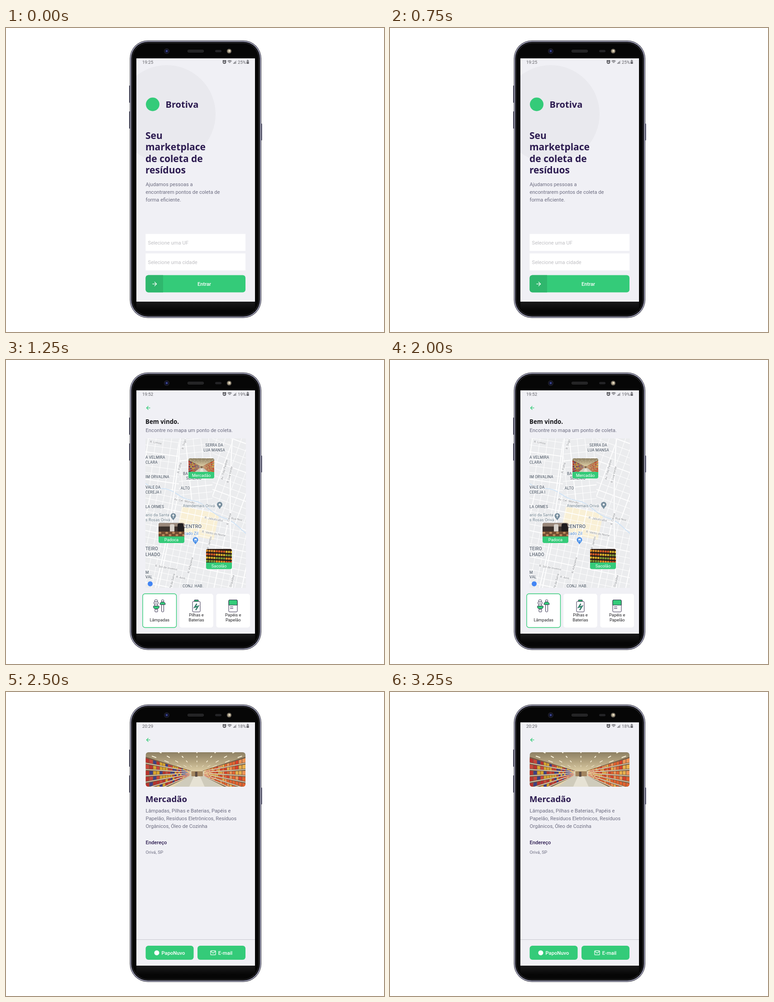
An HTML page with a canvas that plays this animation: 835x671 px, repeating every 3750 ms.

```html
<!DOCTYPE html>
<html lang="pt-BR">
<head>
<meta charset="utf-8">
<title>App de coleta</title>
<style>
html, body { margin: 0; width: 100%; height: 100%; overflow: hidden; background: #fff; }
canvas { display: block; width: 835px; height: 671px; }
</style>
</head>
<body>
<canvas id="stage"></canvas>
<script>
const W = 835, H = 671, HOLD = 1250;
const GREEN = '#34cb79', INK = '#2c1b50', GRAY = '#6c6c80', PAGE = '#f0f0f5';
const canvas = document.getElementById('stage');
const ctx = canvas.getContext('2d');
const dpr = window.devicePixelRatio || 1;
canvas.width = W * dpr;
canvas.height = H * dpr;

function box(x, y, w, h, fill, r = 0) {
  ctx.beginPath();
  ctx.roundRect(x, y, w, h, r);
  ctx.fillStyle = fill;
  ctx.fill();
}

function outline(color, width = 1) {
  ctx.strokeStyle = color;
  ctx.lineWidth = width;
  ctx.stroke();
}

function disc(x, y, r, fill) {
  ctx.beginPath();
  ctx.arc(x, y, r, 0, Math.PI * 2);
  ctx.fillStyle = fill;
  ctx.fill();
}

function trace(points) {
  ctx.beginPath();
  for (let i = 0; i < points.length; i += 2) ctx.lineTo(points[i], points[i + 1]);
}

function poly(points, fill) {
  trace(points);
  ctx.fillStyle = fill;
  ctx.fill();
}

function line(points, color, width = 1) {
  trace(points);
  outline(color, width);
}

function inBox(x, y, w, h, r, draw) {
  ctx.save();
  ctx.beginPath();
  ctx.roundRect(x, y, w, h, r);
  ctx.clip();
  draw();
  ctx.restore();
}

function fade(y0, y1, ...colors) {
  const g = ctx.createLinearGradient(0, y0, 0, y1);
  colors.forEach((c, i) => g.addColorStop(i / (colors.length - 1), c));
  return g;
}

function seeded(seed) {
  return () => (seed = seed * 16807 % 2147483647) / 2147483647;
}

function text(s, x, y, size, color, weight = 400, align = 'left', family = 'Roboto') {
  ctx.font = `${weight} ${size}px "${family}", sans-serif`;
  ctx.textAlign = align;
  ctx.fillStyle = color;
  ctx.fillText(s, x, y);
}

function heading(s, x, y, size, color = INK) {
  text(s, x, y, size, color, 700, 'left', 'Noto Sans');
}

function paragraph(lines, y) {
  lines.forEach((s, i) => text(s, 308.5, y + i * 17, 11.2, GRAY));
}

// Map label with a pale halo, centred vertically on y.
function label(s, x, y, size, color, { weight = 400, align = 'center', tilt = 0 } = {}) {
  ctx.save();
  ctx.translate(x, y);
  ctx.rotate(tilt * Math.PI / 180);
  ctx.font = `${weight} ${size}px Roboto, sans-serif`;
  ctx.textAlign = align;
  ctx.strokeStyle = 'rgba(255,255,255,.7)';
  ctx.lineWidth = 2;
  ctx.strokeText(s, 0, size * .36);
  ctx.fillStyle = color;
  ctx.fillText(s, 0, size * .36);
  ctx.restore();
}

function arrow(x, y, half, dir, color) {
  const tip = x + half * dir;
  line([x - half, y, x + half, y], color, 1.3);
  line([x, y - half, tip, y, x, y + half], color, 1.3);
}

function phone() {
  for (const y of [127, 184]) box(272, y, 4, 38, '#44445c', 1);
  box(562, 211, 4, 37, '#77778e', 1);
  ['#24242f', '#c3c3d8', '#8d8da6', '#18181d', '#0a0a0c', '#343436', '#060606'].forEach((color, d) =>
    box(273.5 + d, 27.5 + d, 290.5 - 2 * d, 612.5 - 2 * d, color, 40 - d));
  box(288, 604, 262, 20, fade(604, 624, '#1b1b1c', '#060606'));

  disc(355, 51, 6, '#25252c');
  disc(355, 51, 4.6, '#0c0e24');
  disc(355, 51, 2.4, '#39438c');
  box(401, 48, 36, 6, '#303032', 3);
  for (let x = 403; x < 436; x += 2) line([x, 49, x, 53], '#111', .8);
  box(462, 48.5, 14, 5, '#242427', 2.5);
  disc(493, 51, 5.5, '#4a4641');
  disc(493, 51, 4, '#a39780');
  disc(493.5, 50.5, 2, '#eee5cb');
}

function statusBar(time, charge) {
  const c = '#606066';
  text(time, 301, 78.5, 9.7, c);
  ctx.beginPath();
  ctx.arc(482.5, 75.3, 3, 0, Math.PI * 2);
  outline('#333338', 1.4);
  line([482.5, 73.5, 482.5, 75.5, 484, 76], '#333338', .9);
  for (const side of [-1, 1])
    line([482.5 + side * 2, 71.2, 482.5 + side * 3.8, 72.7], '#333338', 1.2);
  for (let r = 2; r < 7; r += 2.2) {
    ctx.beginPath();
    ctx.arc(494, 78, r, Math.PI * 1.25, Math.PI * 1.75);
    outline(c, 1.1);
  }
  for (let i = 0; i < 4; i++) box(502 + i * 1.9, 77.3 - i * 1.8, 1.2, 1.7 + i * 1.8, i < 3 ? c : '#a5a5aa');
  text(charge, 512, 78.5, 9.7, c);
  box(532.7, 70.5, 2.6, 1.5, c);
  box(531.5, 71.7, 5, 7.3, '#929298', .8);
  box(531.5, 75.5, 5, 3.5, c, .8);
}

function welcome() {
  disc(355, 190, 108, '#e9e9ee');
  statusBar('19:25', '25%');
  disc(324, 168.5, 15, GREEN);
  heading('Brotiva', 352.5, 176.2, 20);
  ['Seu', 'marketplace', 'de coleta de', 'resíduos']
    .forEach((s, i) => heading(s, 308, 244.8 + i * 25.4, 21));
  paragraph(['Ajudamos pessoas a', 'encontrarem pontos de coleta de', 'forma eficiente.'], 349.3);
  ['Selecione uma UF', 'Selecione uma cidade'].forEach((s, i) => {
    box(308.5, 454.5 + i * 43, 220.5, 37.5, '#fff');
    text(s, 313.5, 477.5 + i * 43, 11.2, '#c0c0c4');
  });
  inBox(308.5, 545.5, 220.5, 38, 6, () => {
    box(308, 545, 222, 39, GREEN);
    box(308, 545, 39, 39, '#2fb76d');
  });
  arrow(328, 565, 4.6, 1, '#fff');
  text('Entrar', 438, 569, 11.2, '#fff', 500, 'center');
}

// Supermarket aisle in a 220 x 76 field; everything runs to one vanishing point.
function aisle(x, y, w, h, r) {
  const vx = 113, vy = 45;
  const random = seeded(7);
  const toward = (px, py, t) => [px + (vx - px) * t, py + (vy - py) * t];
  const goods = [['#b8322d', '#3f3f83', '#d9a52e', '#c9463a'], ['#e2622f', '#d8402b', '#ee9356', '#e9b04c']];

  inBox(x, y, w, h, r, () => {
    ctx.translate(x, y);
    ctx.scale(w / 220, h / 76);
    box(0, 0, 220, 76, fade(0, 45, '#8d8063', '#b7a783', '#e2d3ab'));
    for (let lane = -4; lane <= 4; lane++)
      for (let t = .08; t < .85; t += .2) {
        const px = vx + lane * 46;
        line([...toward(px, -6, t), ...toward(px, -6, t + .07)], '#fff8e2', 2.6 * (1 - t));
      }
    poly([vx - 8, vy, vx + 8, vy, 168, 76, 62, 76], '#cfcbbb');
    poly([vx - 3, vy, vx + 3, vy, 130, 76, 96, 76], '#e6e2d4');

    [0, 220].forEach((edge, side) => {
      poly([edge, 10, ...toward(edge, 10, .88), ...toward(edge, 100, .88), edge, 100], '#735b45');
      for (let row = 0; row < 6; row++) {
        const top = 13 + row * 14;
        for (let t = 0; t < .85; t += .07 * (1.1 - t)) {
          const end = t + .06 * (1.1 - t);
          const color = goods[side][Math.floor(random() * 4)];
          poly([...toward(edge, top, t), ...toward(edge, top, end),
            ...toward(edge, top + 9, end), ...toward(edge, top + 9, t)], color);
        }
        line([edge, top + 11, ...toward(edge, top + 11, .88)], '#eadfc4', 1.6);
      }
    });
    box(101, 42, 25, 11, '#a3855f');
    box(109, 43, 5, 11, '#5a4a42');
  });
}

function bakery(x, y) {
  box(x, y, 57, 32, '#3b302c');
  box(x, y, 57, 8, '#99877a');
  box(x + 25, y + 3, 10, 18, '#d8d2cc', 3);
  box(x + 42, y + 1, 13, 21, '#201d1f', 4);
  box(x, y + 19, 57, 13, '#744c31');
  for (let i = 0; i < 8; i++) box(x + i * 7.5, y + 20 + i % 2 * 5, 6, 4, '#c49060', 2);
}

function produce(x, y) {
  box(x, y, 57, 32, '#33221a');
  const colors = ['#e29127', '#d65a25', '#dfb62c', '#7f9c35'];
  for (let row = 0; row < 4; row++)
    for (let i = 0; i < 11; i++)
      disc(x + 2 + i * 5.4, y + 4 + row * 7.5 + i * .3, 2.4, colors[(row + (i >> 2)) % 4]);
}

function pinCard(x, y, name, picture) {
  inBox(x, y, 57, 44.5, 4, () => {
    picture(x, y);
    box(x, y + 30, 57, 15, GREEN);
  });
  text(name, x + 28.5, y + 40.6, 9.3, '#fff', 400, 'center');
}

// Street grid filling the current clip.
function streets(angle, stepX, stepY) {
  ctx.save();
  ctx.translate(420, 400);
  ctx.rotate(angle * Math.PI / 180);
  for (let i = -30; i <= 30; i++) {
    const width = i % 4 ? 1 : 1.9;
    line([i * stepX, -400, i * stepX, 400], '#fff', width);
    line([-400, i * stepY, 400, i * stepY], '#fff', width);
  }
  ctx.restore();
}

function riverPath() {
  const points = [];
  for (let t = 0; t <= 1.01; t += .04)
    points.push(308 + 222 * t, 273 + 107 * t - 13 * Math.sin(Math.PI * t) + 3 * Math.sin(20 * t));
  return points;
}

function marker(x, y, color) {
  poly([x - 5.3, y + 2, x, y + 10, x + 5.3, y + 2], color);
  disc(x, y, 6, color);
}

function map() {
  const land = '#ebecee';
  const river = riverPath();
  box(308, 173, 222, 330, land);
  [8, -6, 20].forEach((angle, i) =>
    inBox(308 + i * 74, 173, 74, 220, 0, () => streets(angle, 17, 15)));
  ctx.save();
  trace([...river, 530, 503, 308, 503]);
  ctx.clip();
  box(308, 173, 222, 330, land);
  ctx.save();
  ctx.translate(424, 364);
  ctx.rotate(.21);
  box(-43, -33, 84, 58, '#f9f0d6');
  ctx.restore();
  streets(12, 15, 14);
  ctx.restore();
  line(river, '#cfe3f6', 1.8);
  for (const [x, lean] of [[385, -55], [500, 0]])
    for (const [color, width] of [['#dddfe3', 3.4], ['#fff', 2.6]]) {
      ctx.beginPath();
      ctx.moveTo(x, 173);
      ctx.quadraticCurveTo(x - 10, 320, x + lean, 503);
      outline(color, width);
    }

  const names = {
    10: [['R. Limos', 331, 182], ['Av. Cel. Morvão', 394, 311], ['R. Jabuticaba', 459, 351],
      ['R. Vento do Norte', 459, 383], ['Rua Noz', 510, 351], ['R. Sol de Inverno', 354, 458], ['R. Anis', 386, 480]],
    [-76]: [['R. Trigo', 393, 186], ['R. Folha', 383, 238], ['Av. Três Pedras', 482, 242], ['R. Lua Verde', 494, 253],
      ['R. Cereja', 492, 351], ['R. Jambo', 449, 403], ['R. Alfazema', 407, 453], ['Pé de Serra', 367, 488], ['Orquídea', 499, 488]]
  };
  for (const tilt in names)
    for (const [s, x, y] of names[tilt]) label(s, x, y, 6.7, '#888b90', { tilt: +tilt });

  const area = '#5d6774', place = '#6b7d8a';
  const bold = { weight: 500 }, edge = { weight: 500, align: 'left' }, start = { align: 'left' };
  label('SERRA DA', 460, 188, 8.5, area, bold);
  label('LUA MANSA', 460, 199, 8.5, area, bold);
  label('BA', 391, 251, 8.5, area, edge);
  label('SERÊNIO', 415, 261, 8.5, area, bold);
  label('ALTO', 396, 283, 8.5, area, bold);
  label('CENTRO', 411, 367.5, 11, area, bold);
  label('CONJ. HAB.', 413, 499, 8.5, area, bold);
  const districts = { 215: 'A VELMIRA', 226: 'CLARA', 258: 'IM ORVALINA', 281: 'VALE DA', 292: 'CEREJA I', 324: 'LA ORMES', 469: 'M', 479: 'VAL' };
  for (const y in districts) label(districts[y], 308, +y, 8.5, area, edge);
  ['TEIRO', 'LHADO'].forEach((s, i) => label(s, 308, 416 + i * 13, 10, area, edge));
  ['ario da Santa', 's Rosas Orivá'].forEach((s, i) => label(s, 308, 342 + i * 10.5, 9, place, start));
  label('Atendemais Orivá', 426, 322, 9, place);
  label('cado Zil', 393, 383, 9, '#4b86cf', start);

  marker(472, 319, '#778e9e');
  disc(472, 319, 2.2, '#fff');
  marker(369.5, 344, '#778e9e');
  line([369.5, 340, 369.5, 348], '#fff', 1.3);
  line([367, 343, 372, 343], '#fff', 1.3);
  marker(418.5, 397, '#4a90e8');
  box(416, 394.5, 5.5, 3, '#fff');
  disc(417.2, 399.5, .9, '#fff');
  disc(420.6, 399.5, .9, '#fff');
  disc(318.5, 494, 5.5, '#4285f4');
}

function part(x, y, w, h, fill, r = 1) {
  box(x, y, w, h, fill, r);
  outline('#322b4a');
}

function tile(x, lines, active) {
  box(x, 516, 74.5, 74.5, '#fff', 5);
  if (active) outline(GREEN, 1.4);
  const first = lines.length > 1 ? 566 : 577;
  lines.forEach((s, i) => text(s, x + 37.3, first + i * 11, 9.3, '#222226', 400, 'center'));
}

function itemIcons() {
  for (let i = 0; i < 3; i++) part(328 - i % 2 * 1.5, 529.5 + i * 4.5, 7 + i % 2 * 3, 4.5, '#fff', 2);
  part(325.5, 543, 13, 6.5, GREEN, [1, 1, 5, 5]);
  part(329, 550, 6, 6, '#fff');
  part(343.5, 529.5, 5, 4.5, '#fff');
  part(340, 534, 12, 6, GREEN, [5, 5, 1, 1]);
  part(343.5, 540, 5, 16, '#fff', 2);

  part(416, 529.5, 9, 3.5, GREEN);
  part(412, 533, 17, 23, '#fff', 2);
  const bolt = [421.5, 538, 416.5, 546, 424.5, 543.5, 419, 552];
  line(bolt, INK, 2.4);
  line(bolt, GREEN, 1.3);

  part(492, 529.5, 19, 26.5, '#fff', 2);
  part(492, 529.5, 19, 11.5, GREEN, [2, 2, 0, 0]);
  for (const y of [545, 548.5]) line([495, y, 502, y], INK);
}

function points() {
  statusBar('19:52', '19%');
  arrow(314.5, 105.7, 4, -1, GREEN);
  heading('Bem vindo.', 308, 141.3, 13.3, '#141418');
  paragraph(['Encontre no mapa um ponto de coleta.'], 159.3);
  inBox(308, 173, 222, 330, 2, map);
  pinCard(403, 217, 'Mercadão', (x, y) => aisle(x, y, 57, 31, 0));
  pinCard(337, 359.5, 'Padoca', bakery);
  pinCard(442, 417, 'Sacolão', produce);
  [['Lâmpadas'], ['Pilhas e', 'Baterias'], ['Papéis e', 'Papelão']]
    .forEach((lines, i) => tile(302 + i * 81.2, lines, i === 0));
  itemIcons();
}

function detail() {
  statusBar('20:29', '18%');
  arrow(314.5, 105.7, 4, -1, GREEN);
  aisle(308.5, 133, 220.5, 76, 6);
  heading('Mercadão', 308, 242.8, 18.6);
  paragraph(['Lâmpadas, Pilhas e Baterias, Papéis e', 'Papelão, Resíduos Eletrônicos, Resíduos', 'Orgânicos, Óleo de Cozinha'], 265.5);
  text('Endereço', 308.5, 335.8, 11.2, INK, 500);
  text('Orivá, SP', 308.5, 356.5, 9.8, GRAY);
  line([288, 546.5, 550, 546.5], '#c8c8cf');
  for (const x of [308.5, 423]) box(x, 560, 106, 31, GREEN, 6);
  disc(333, 575.7, 5.5, '#fff');
  text('PapoNuvo', 343.5, 580, 11.2, '#fff', 500);
  ctx.beginPath();
  ctx.roundRect(452, 571.2, 11, 9, 1);
  outline('#fff', 1.2);
  line([452, 572.3, 457.5, 576.3, 463, 572.3], '#fff', 1.2);
  text('E-mail', 468.7, 580, 11.2, '#fff', 500);
}

const screens = [welcome, points, detail];

function render(now) {
  ctx.setTransform(dpr, 0, 0, dpr, 0, 0);
  box(0, 0, W, H, '#fff');
  phone();
  inBox(288, 67, 262, 537, 0, () => {
    box(288, 67, 262, 537, PAGE);
    screens[Math.floor(now / HOLD) % screens.length]();
  });
}

function loop() {
  render(performance.now());
  requestAnimationFrame(loop);
}
loop();
</script>
</body>
</html>
```
